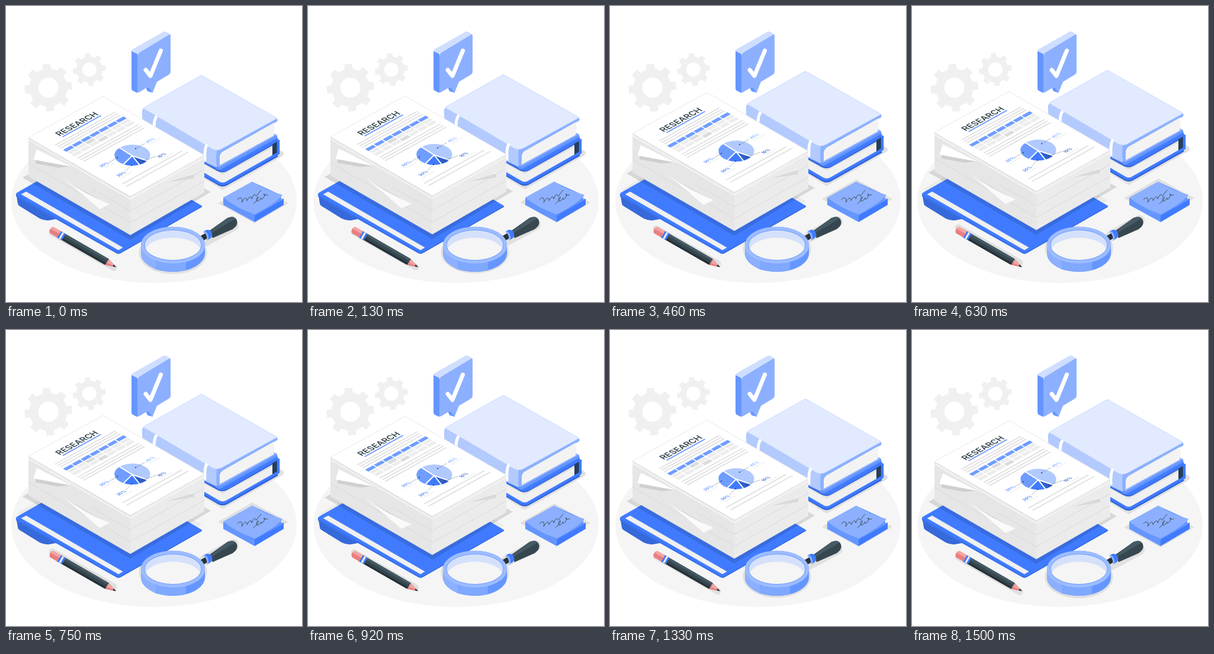
These frames come from a looping animation (500 by 500 pixels, 1.54 s). An HTML page:

```html
<!DOCTYPE html>
<html lang="en">
<head>
<meta charset="utf-8">
<title>Research desk</title>
<style>
html, body { margin: 0; width: 100%; height: 100%; overflow: hidden; background: #fff; }
svg { display: block; width: 100vw; height: 100vh; }
text { font-family: Inter, Roboto, sans-serif; font-weight: 600; }
</style>
</head>
<body>
<svg viewBox="0 0 500 500">
  <ellipse cx="250" cy="329" rx="241" ry="139" fill="#f5f5f5"/>
  <g id="gears" fill="#f0f0f0" fill-rule="evenodd"></g>

  <!-- shadows of the resting objects -->
  <g class="float" fill="#e0e0e0">
    <path d="M18 318L190 417L331 337L158 238Z" fill="#000" fill-opacity=".04"/>
    <path d="M358 333L416 300L477 333L420 367Z"/>
    <ellipse cx="282" cy="417" rx="57.500" ry="36"/>
    <path d="M336 397L384 371" stroke="#e0e0e0" stroke-width="18" stroke-linecap="round"/>
    <path d="M78 383L182 442" stroke="#e0e0e0" stroke-width="11" stroke-linecap="round"/>
  </g>

  <!-- speech bubble -->
  <path d="M236 137L239 144L248 146.500V138Z" fill="#6596ff"/>
  <path d="M212 76L222 81V147L214 143Q212 142 212 139Z" fill="#6596ff"/>
  <path d="M212 76Q212 74 214 73L266 43.500Q268 42.500 270 43.500L277 47L223 81Z" fill="#cfdeff"/>
  <path d="M222 84Q222 81 225 79L275 48.500Q278 47 278 50V111Q278 114 275 116L255 128L247.500 146.500L240 136.500L225 145.500Q222 147 222 144Z" fill="#8cb0ff"/>
  <path d="M236 108L244 118L261.500 75.500" fill="none" stroke="#fff" stroke-width="7" stroke-linecap="round" stroke-linejoin="round"/>

  <!-- books -->
  <g class="float">
    <path d="M300 270L366 311L466 254Q472 250 467 246L440 230Z" fill="#e0e0e0"/>
    <path d="M300 250L366 285L452 238V254L368 301L300 264Z" fill="#f0f0f0"/>
    <path d="M450 231L460 226V249L450 253Z" fill="#263e59"/>
    <g fill="none" stroke-linejoin="round">
      <path d="M300 267L360 302Q366 305 372 302L459 253" stroke="#2b5fd6" stroke-width="3"/>
      <path d="M300 264L360 299Q366 302 372 299L460 249V226" stroke="#407bff" stroke-width="4.500"/>
      <path d="M300 245L359 278Q366 281 372 278L450 234" stroke="#2b5fd6" stroke-width="3"/>
      <path d="M300 240L359 273.500Q366 277 372 274L459 224" stroke="#407bff" stroke-width="8"/>
    </g>
    <path d="M231 174Q229 180 231 192L336 264L358 274L458 222V218L452 215L362 267V248L458 195V190L357 240Z" fill="#8cb0ff"/>
    <path d="M361 269V254Q361 249 366 246L452 197Q455 207 452 219Z" fill="#f3f3f3"/>
    <path d="M357 240Q354 249 356 273L330 260L231 194Q229 181 232 173Z" fill="#b3caff"/>
    <path d="M359 271Q355 251 365 244L458 191.500" fill="none" stroke="#8cb0ff" stroke-width="4.500"/>
    <path d="M356 272Q359 276 363 273.500L458 220.500" fill="none" stroke="#6596ff" stroke-width="4.500"/>
    <path d="M232 173Q232 172 234 171L328 118Q330 117 332 118L457 189Q458 190 456 191L363 242Q356 245 349 242Z" fill="#e1eaff" stroke="#b3caff" stroke-width=".6"/>
    <path d="M255 186Q250 190 250 207M340 234Q335 239 336 262" fill="none" stroke="#fff" stroke-width="5"/>
  </g>

  <!-- folder -->
  <path d="M18 322L20 334Q20 336 23 338L57 359Q65 363 73 362L84 360Q89 359 95 363L187 417L190 405L60 325Z" fill="#3669d9"/>
  <path d="M17 319Q16 317 19 315L158 236L330 337Q332 338 330 340L194 417.500Q190 420 186 417.500L18 322.500Q16 321 17 319Z" fill="#407bff"/>
  <path d="M17 320L186 416Q190 418.500 194 416.500L331 338.500" fill="none" stroke="#3669d9" stroke-width="1.200"/>
  <path d="M25.500 318L34 313.500L197.500 408L190 412.500Z" fill="#f0f0f0"/>

  <!-- paper stack -->
  <g class="float">
    <path d="M28 290L155 215L346 314L210 395Z" fill="#000" fill-opacity=".12"/>
    <path d="M38 222L210 322V387L38 288Z" fill="#e6e6e6"/>
    <path d="M335 252L210 322V387L335 315Z" fill="#ebebeb"/>
    <path d="M38 226L210 326L335 256" fill="none" stroke="#f5f5f5" stroke-width="2"/>
    <path d="M144 308L210 346L335 276M38 266L210 366L335 296" fill="none" stroke="#d9d9d9"/>
    <path d="M50 258L110 271L88 273L50 266Z" fill="#cfcfcf"/>
    <path d="M52 242L111 271.500L46.500 259.500Z" fill="#fff"/>
    <path d="M110 300L174 336L148 332Z" fill="#cfcfcf"/>
    <path d="M97 291Q130 316 175 335L158 343Z" fill="#fafafa"/>
    <path d="M272 298Q300 291 317 282V286Z" fill="#fafafa"/>
    <path d="M272 298L317 284L318 291Z" fill="#d9d9d9"/>
    <path d="M38 222L164 153L335 252L210 322Z" fill="#fff" stroke="#e3e3e3" stroke-width=".8"/>
    <g id="page" transform="matrix(.866 -.48 .866 .5 38 222)">
      <text x="33" y="28" font-size="14.300" fill="#37474f">RESEARCH</text>
      <path d="M35 31.500H110" stroke="#6596ff" stroke-width="2"/>
    </g>
    <g id="pie" stroke="#fff" stroke-width="1.800" stroke-linejoin="round"></g>
    <g id="labels"></g>
  </g>

  <!-- sticky notes -->
  <path d="M367 324L420 353V365L367 336Z" fill="#6596ff"/>
  <path d="M420 353L469 325V336L420 365Z" fill="#407bff"/>
  <path d="M367 324L416 297L466 320Q462 325 468 327L420 354Z" fill="#6596ff"/>
  <path d="M367 323.500L416 296.500Q439 312 467 319Q458 332 420 352Q390 342 367 323.500Z" fill="#8cb0ff"/>
  <g fill="none" stroke="#37474f" stroke-width=".9" stroke-linecap="round" stroke-linejoin="round">
    <path d="M391 327Q396 322 398 325Q400 330 398 332Q404 322 406 325T407 329Q412 320 414 323T415 326Q419 316 421 319T423 321Q428 314 431 311"/>
    <path d="M418 334Q428 325 426 322Q422 324 424 330Q428 330 431 324Q430 329 434 325Q439 318 436 317Q433 321 442 319"/>
  </g>

  <!-- magnifier -->
  <path d="M328 394L344 385" stroke="#263238" stroke-width="9"/>
  <path d="M343 380L374 358Q386 353 390 362Q393 370 383 377L349 392Z" fill="#37474f"/>
  <path d="M344 381L374 358Q384 354 388 359Q378 365 346 384Z" fill="#455a64"/>
  <path d="M335 380Q341 376 346 380Q351 387 346 392L340 396Q342 387 335 380Z" fill="#407bff"/>
  <path d="M334 381Q341 383 341 395" fill="none" stroke="#8cb0ff" stroke-width="3"/>
  <path d="M228 404A54 31 0 0 1 336 404V418A54 31 0 0 1 228 418Z" fill="#6596ff"/>
  <path d="M228 404V418Q230 434 253 445V431Z" fill="#8cb0ff"/>
  <path d="M253 431Q282 439 304 432V446Q282 452 253 445Z" fill="#7fa8ff"/>
  <ellipse cx="282" cy="404" rx="48" ry="25.500" fill="#d5e1fb"/>
  <path d="M235.600 410.500A48 25.500 0 0 1 328.400 410.500A48 25.500 0 0 1 235.600 410.500Z" fill="#f5f5f5"/>
  <ellipse cx="282" cy="404" rx="51" ry="28.200" fill="none" stroke="#9cbcff" stroke-width="6"/>
  <ellipse cx="282" cy="404" rx="48" ry="25.500" fill="none" stroke="#6596ff" stroke-width=".8"/>

  <!-- pencil -->
  <g transform="translate(78 379) rotate(29.900)">
    <path d="M12 -6H106L124.500 0L106 6H12Z" fill="#37474f"/>
    <path d="M12 -6H106V-2H12Z" fill="#455a64"/>
    <path d="M12 2.500H106V6H12Z" fill="#263238"/>
    <path d="M14 -6H0Q-4 -5 -4 0T0 6H14Z" fill="#e87f7f"/>
    <path d="M14 -6H0Q-4 -5 -3 -1H14Z" fill="#f5a3a3"/>
    <path d="M13.500 -6H22.500V6H13.500Z" fill="#407bff"/>
    <path d="M16.500 -6H19.500V6H16.500Z" fill="#f0f0f0"/>
    <path d="M106 -6L119 -1.800V1.800L106 6Q109 3 106 2Q109 0 106 -2Q109 -4 106 -6Z" fill="#f5a3a3"/>
    <path d="M106 2L119 0V1.800L106 6Q109 3 106 2Z" fill="#e87f7f"/>
    <path d="M119 -1.800L124.500 0L119 1.800Z" fill="#263238"/>
  </g>
</svg>
<script>
const $ = id => document.getElementById(id);

function add(parent, tag, attrs, label) {
  const el = document.createElementNS('http://www.w3.org/2000/svg', tag);
  for (const key in attrs) el.setAttribute(key, attrs[key]);
  if (label) el.textContent = label;
  parent.appendChild(el);
  return el;
}

function gear(cx, cy, body, outer, hole, tilt) {
  const pts = [];
  const put = (r, deg) => {
    const a = deg * Math.PI / 180;
    pts.push((cx + r * Math.cos(a)).toFixed(1) + ' ' + (cy + r * Math.sin(a)).toFixed(1));
  };
  for (let i = 0; i < 8; i++) {
    const a = tilt + i * 45;
    put(body, a - 13); put(outer, a - 9); put(outer, a + 9); put(body, a + 13); put(body, a + 22.5);
  }
  const ring = `M${cx - hole} ${cy}a${hole} ${hole} 0 1 0 ${2 * hole} 0a${hole} ${hole} 0 1 0 ${-2 * hole} 0Z`;
  add($('gears'), 'path', { d: 'M' + pts.join('L') + 'Z' + ring });
}
gear(71.5, 138, 32, 40.5, 17, -95);
gear(140.8, 107.5, 22, 28, 12, -97);

// printed lines and table
const page = $('page');
const rule = (v, to) => add(page, 'path', { d: `M13 ${v}H${to}`, stroke: '#dcdcdc', 'stroke-width': 1.8 });
[[39, 130], [44, 130], [49, 130], [83, 132], [88.5, 132], [94, 132], [170, 130], [178, 134]].forEach(r => rule(...r));
for (let row = 0; row < 3; row++) {
  for (let col = 0; col < 7; col++) {
    const grey = (col * 2 + row * 3) % 5 === 2 ? '#dcdcdc' : '#ededed';
    add(page, 'rect', {
      x: 13 + col * 17.1, y: 54.5 + row * 8, width: 15.2, height: 6.4,
      fill: row ? grey : '#6f9dff'
    });
  }
}

// pie on the sheet; angles in degrees, clockwise from the right
const rim = deg => {
  const a = deg * Math.PI / 180;
  return (213.3 + 31 * Math.cos(a)).toFixed(1) + ' ' + (252 + 18.5 * Math.sin(a)).toFixed(1);
};
function slice(from, to, fill) {
  add($('pie'), 'path', {
    d: `M213 253L${rim(from)}A31 18.5 0 ${to - from > 180 ? 1 : 0} 1 ${rim(to)}Z`, fill
  });
}
slice(-136, 32, '#b0c9ff');
slice(32, 66, '#2f5fd0');
slice(66, 120, '#407bff');
slice(120, 224, '#6f9dff');

function label(txt, x, y, fill, from, to) {
  const g = $('labels');
  add(g, 'path', {
    d: `M${from}L${to}`, fill: 'none', stroke: '#455a64', 'stroke-width': .8, 'stroke-dasharray': '1.5 1.5'
  });
  const [cx, cy] = from.split(' ');
  add(g, 'circle', { cx, cy, r: 1, fill: '#263e59' });
  const t = add(g, 'g', { transform: `matrix(.866 -.48 .866 .5 ${x} ${y})` });
  add(t, 'text', { 'font-size': 7, fill }, txt);
  add(t, 'path', { d: 'M0 4H22', stroke: '#e6e6e6', 'stroke-width': 1 });
}
label('45%', 239, 232, '#8cb0ff', '219 241', '235 232');
label('30%', 161, 273, '#5a8dff', '188 256', '173 265');
label('30%', 190, 289, '#407bff', '212 269', '202 279');
label('10%', 259, 257, '#2f5fd0', '231 262', '254 254');

const LOOP = 1540, STEPS = 37, LEAD = 80;
const floats = document.querySelectorAll('.float');

function draw(ms) {
  const step = Math.floor((ms % LOOP) / LOOP * STEPS + 1e-6);
  const t = step / STEPS * LOOP;
  const y = 4.5 * (Math.cos((t + LEAD) / LOOP * 2 * Math.PI) - .95);
  floats.forEach(g => g.setAttribute('transform', `translate(0 ${y.toFixed(2)})`));
}

const start = performance.now();
function tick() {
  draw(performance.now() - start);
  requestAnimationFrame(tick);
}
tick();
</script>
</body>
</html>
```
